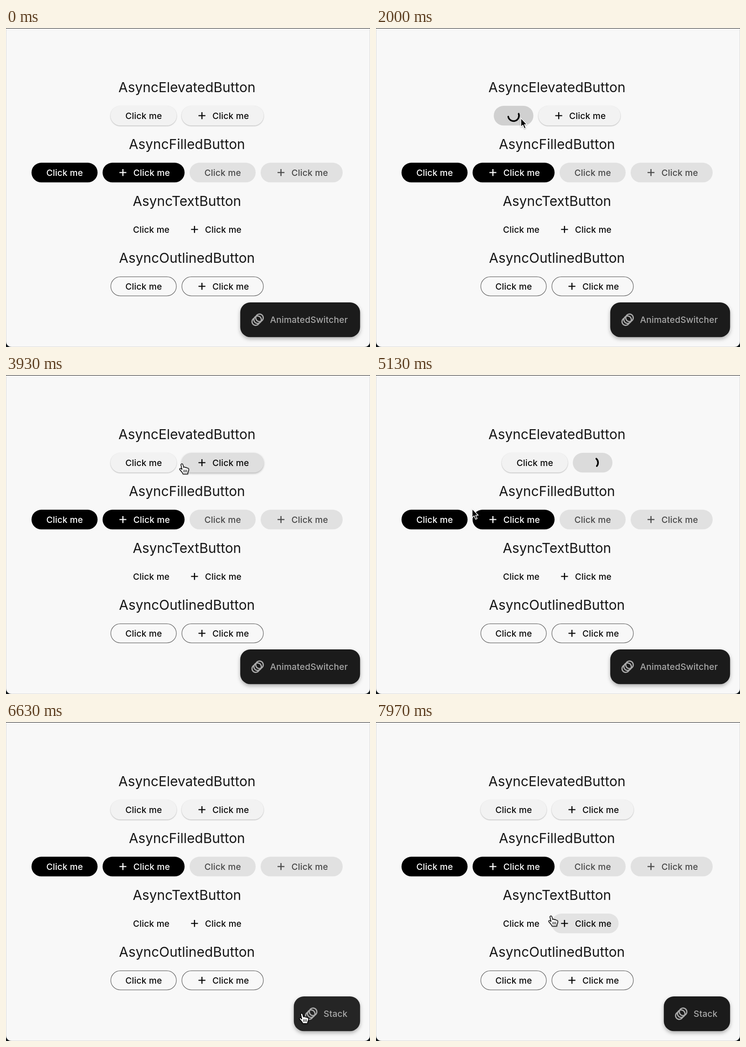
An HTML page that plays this animation: 799 by 701 pixels, repeating every 8 s.

```html
<!DOCTYPE html>
<html lang="en">
<head>
<meta charset="utf-8">
<title>Async buttons</title>
<style>
  html, body { margin: 0; width: 100%; height: 100%; overflow: hidden; background: #10161a; }
  svg { display: block; width: 799px; height: 701px; font-family: Inter, "Open Sans", sans-serif; }
  .title { font-size: 29.9px; font-weight: 430; text-anchor: middle; fill: #171717; }
  .label { font-size: 19.2px; font-weight: 500; letter-spacing: .16px; }
</style>
</head>
<body>
<svg viewBox="0 0 799 701">
  <path d="M.5 1V689.5a11 11 0 0 0 11 11H787.5a11 11 0 0 0 11-11V1" fill="#f8f8f8" stroke="#dcdcdc"/>
  <path d="M0 .5H799" stroke="#151515"/>
  <g id="titles"></g>
  <g id="scene"></g>
</svg>
<script>
const LOOP = 8000, MID = 397.5, GAP = 11, H = 43.3, SMALL = 87;
const ROWS = [171, 296, 421, 546];
const clamp = x => Math.min(1, Math.max(0, x));
const mix = (a, b, k) => a + (b - a) * k;
const ease = x => x * x * (3 - 2 * x);
const ramp = (t, start, length) => ease(clamp((t - start) / length));
const pulse = (t, [from, to], length = 80) => ramp(t, from, length) - ramp(t, to, length);
const within = (t, spans) => spans.some(([a, b]) => t >= a && t < b);
const gray = v => `rgb(${[v, v, v].map(Math.round)})`;

// Material "fast out, slow in" curve, cubic-bezier(.4, 0, .2, 1)
function fastOutSlowIn(x) {
  x = clamp(x);
  let lo = 0, hi = 1, s = .5;
  for (let i = 0; i < 18; i++) {
    s = (lo + hi) / 2;
    const bx = 1.2 * s * (1 - s) ** 2 + .6 * s * s * (1 - s) + s ** 3;
    if (bx < x) lo = s; else hi = s;
  }
  return s * s * (3 - 2 * s);
}

function spinner(cx, cy, age, alpha) {
  const phase = age / 1333 % 1, turn = 1.5 * Math.PI, r = 11.9;
  const head = fastOutSlowIn(phase * 2) * turn;
  const tail = fastOutSlowIn(phase * 2 - 1) * turn;
  const a = -Math.PI / 2 + tail + age / 2222 * 2 * Math.PI + phase * Math.PI / 2;
  const sweep = Math.max(head - tail, .01);
  const at = q => `${cx + r * Math.cos(q)} ${cy + r * Math.sin(q)}`;
  return `<path d="M${at(a)}A${r} ${r} 0 ${+(sweep > Math.PI)} 1 ${at(a + sweep)}" fill="none"
    stroke="#000" stroke-width="3.5" stroke-linecap="round" opacity="${alpha}"/>`;
}

const label = (x, y, text, color, alpha = 1) =>
  `<text class="label" x="${x}" y="${y}" fill="${color}" opacity="${alpha}">${text}</text>`;

function content(x, y, icon, color, pad = 32.6, alpha = 1) {
  const cy = y + H / 2, cx = x + pad + 12;
  const plus = icon ? `<path d="M${cx - 7.6} ${cy}h15.2M${cx} ${cy - 7.6}v15.2"
    stroke="${color}" stroke-width="2.4" opacity="${alpha}"/>` : '';
  return plus + label(x + pad + (icon ? 35 : 0), cy + 7, 'Click me', color, alpha);
}

const pill = (x, y, w, attrs, h = H) =>
  `<rect x="${x}" y="${y}" width="${w}" height="${h}" rx="${h / 2}" ${attrs}/>`;

// Places buttons side by side around the middle
function row(widths, draw) {
  let x = MID - (widths.reduce((a, b) => a + b) + GAP * (widths.length - 1)) / 2;
  return widths.map((w, i) => {
    const part = draw(x, w, i);
    x += w + GAP;
    return part;
  }).join('');
}

const elevated = [
  { width: 145, hover: [820, 3850], load: [1700, 3700] },
  { width: 180, hover: [3840, 4180], load: [4175, 6175] }
];

function elevatedRow(t) {
  const y = ROWS[0];
  const loads = elevated.map(b => pulse(t, b.load, 95));
  return row(elevated.map((b, i) => mix(b.width, SMALL, loads[i])), (x, w, i) => {
    const b = elevated[i], k = loads[i], over = pulse(t, b.hover);
    const shade = mix(242 - 19 * over, 219 - 11 * over, k);
    const shadow = `filter:drop-shadow(0 ${1 + over}px ${1 + over}px rgba(0,0,0,${.28 * (1 - k)}))`;
    const [start, end] = b.load;
    const hidden = ramp(t, start, 110) - ramp(t, end + 40, 180);
    return pill(x, y, w, `fill="${gray(shade)}" style="${shadow}"`)
      + (hidden < 1 ? content(x + (w - b.width) / 2, y, i, '#080808', 32.6, 1 - hidden) : '')
      + (k > 0 ? spinner(x + w / 2, y + H / 2, t - start, k) : '');
  });
}

function filledRow(t) {
  const over = pulse(t, [330, 500]);
  return row([145, 180, 145, 180], (x, w, i) => {
    const fill = i < 2 ? '#000' : gray(225 - (i === 2 ? 11 * over : 0));
    return pill(x, ROWS[1], w, `fill="${fill}"`) + content(x, ROWS[1], i % 2, i < 2 ? '#fff' : '#484848');
  });
}

function textRow(t) {
  const over = pulse(t, [7890, LOOP], 70);
  return row([112, 147], (x, w, i) =>
    (i ? pill(x, ROWS[2], w, `fill="#e3e3e3" opacity="${over}"`) : '')
    + content(x, ROWS[2], i, '#080808', 16.3));
}

const outlinedRow = () => row([145, 180], (x, w, i) =>
  pill(x + .6, ROWS[3] + .6, w - 1.2, 'fill="none" stroke="#6c6c6c" stroke-width="1.3"', H - 1.2)
  + content(x, ROWS[3], i, '#080808'));

const ICON = 'M15 2c-2.71 0-5.05 1.54-6.22 3.78-1.28.67-2.34 1.72-3 3C3.54 9.95 2 12.29 2 15c0 3.87 3.13 7 7 7 2.71 0 5.05-1.54 6.22-3.78 1.28-.67 2.34-1.72 3-3C20.46 14.05 22 11.71 22 9c0-3.87-3.13-7-7-7z'
  + 'M9 20c-2.76 0-5-2.24-5-5 0-1.12.37-2.16 1-3 0 3.87 3.13 7 7 7-.84.63-1.88 1-3 1z'
  + 'M12 17c-2.76 0-5-2.24-5-5 0-1.12.37-2.16 1-3 0 3.86 3.13 6.99 7 7-.84.63-1.88 1-3 1z'
  + 'M16.7 13.7c-.53.19-1.1.3-1.7.3-2.76 0-5-2.24-5-5 0-.6.11-1.17.3-1.7.53-.19 1.1-.3 1.7-.3 2.76 0 5 2.24 5 5 0 .6-.11 1.17-.3 1.7z'
  + 'M19 12c0-3.87-3.13-7-7-7 .84-.63 1.88-1 3-1 2.76 0 5 2.24 5 5 0 1.12-.37 2.16-1 3z';

function modeButton(t) {
  const stack = t >= 6560, x = stack ? 631.8 : 514.2;
  const shade = gray(27 + 10 * pulse(t, [6390, 7290]));
  return `<rect x="${x}" y="603" width="${777.2 - x}" height="76.3" rx="22" fill="${shade}"
      style="filter:drop-shadow(0 4px 4px rgba(0,0,0,.3))"/>
    <path d="${ICON}" transform="translate(${x + 21.7} 624.6) scale(1.37)" fill="#a9a9a9" fill-rule="evenodd"/>`
    + label(x + 65.3, 648.2, stack ? 'Stack' : 'AnimatedSwitcher', '#a9a9a9');
}

// Pointer stops: time, x, y
const stops = [
  [230, 705, 592], [330, 405, 324], [470, 405, 324], [1000, 317, 197],
  [3720, 317, 197], [3920, 387, 195], [4150, 408, 200], [4630, 408, 200],
  [5080, 210, 293], [5470, 210, 293], [5980, 601, 546], [6270, 603, 551],
  [6450, 650, 640], [7290, 650, 640], [7330, 619, 643], [7480, 345, 365],
  [7630, 438, 251], [7870, 438, 251], [7960, 385, 426]
];
const handTimes = [[330, 470], [820, 1700], [3700, 4175], [6400, 7310], [7910, LOOP]];

function pointer(t) {
  if (t < stops[0][0]) return '';
  const next = stops.findIndex(s => s[0] > t);
  const b = stops.at(next), a = next < 0 ? b : stops[next - 1];
  const k = a === b ? 0 : ease((t - a[0]) / (b[0] - a[0]));
  const place = `transform="translate(${mix(a[1], b[1], k)} ${mix(a[2], b[2], k)})"
    style="filter:drop-shadow(0 1px 1px rgba(0,0,0,.3))" stroke-linejoin="round" stroke-linecap="round"`;
  if (!within(t, handTimes))
    return `<path ${place} d="M1 1V20.5L5.4 16.4 8.6 24 12 22.6 8.8 15.2H14.4Z"
      fill="#000" stroke="#fff" stroke-width="1.5"/>`;
  return `<g ${place} fill="#fff" stroke="#000" stroke-width="1.5">
    <path d="M-3 2.5C-3.6 .2 .2-.8 1 1.6L3 8.2C3.8 6.6 6.4 7 6.7 8.8C7.8 7.6 10 8 10.3 9.8C12 8.9 14 10 14 12C14.2 16 12.8 17.5 12 19.5V22.5H1.5C.5 18.5-3.5 16-5.6 12.6C-6.8 10.4-4 9.4-2.3 11.2L-.7 12.6Z"/>
    <path d="M3.4 13.5V18.5M6.4 13.5V18.5M9.4 13.5V18.5" stroke-width="1.2"/></g>`;
}

document.getElementById('titles').innerHTML = ['Elevated', 'Filled', 'Text', 'Outlined']
  .map((kind, i) => `<text class="title" x="${MID - .3}" y="${ROWS[i] - 30}">Async${kind}Button</text>`).join('');

const scene = document.getElementById('scene');
const begin = performance.now();
function frame() {
  const t = (performance.now() - begin) % LOOP;
  scene.innerHTML = [elevatedRow, filledRow, textRow, outlinedRow, modeButton, pointer]
    .map(draw => draw(t)).join('');
  requestAnimationFrame(frame);
}
frame();
</script>
</body>
</html>
```
